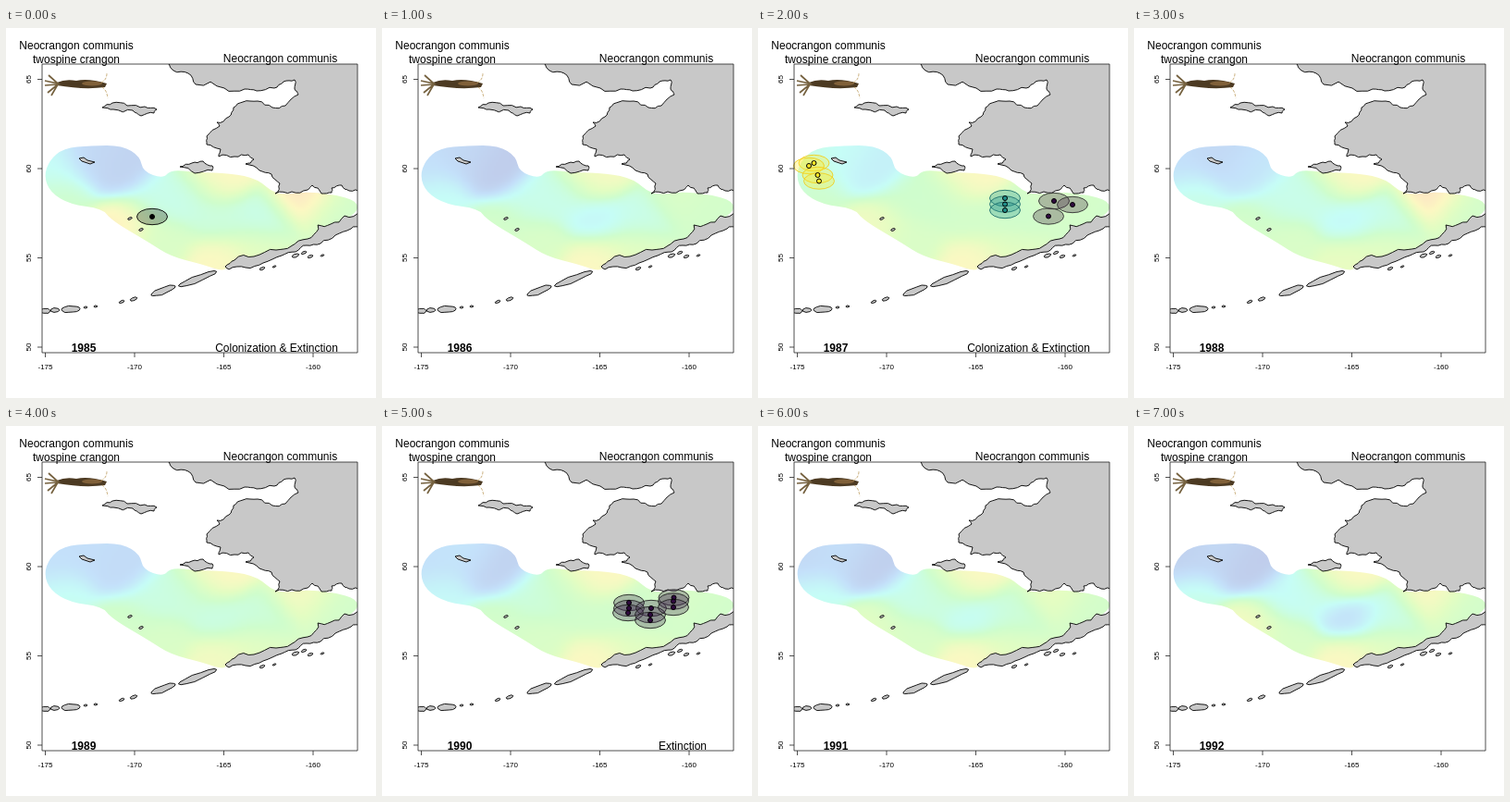
Recreate the animation shown at these times as an HTML page with a canvas. Size 400x400 px, loop 8000 ms.

```html
<!DOCTYPE html>
<html lang="en">
<head>
<meta charset="utf-8">
<title>Colonization and extinction map</title>
<style>
html, body { margin: 0; width: 100%; height: 100%; overflow: hidden; background: #fff; }
canvas, svg { position: absolute; left: 0; top: 0; width: 400px; height: 400px; }
text { font: 12px "Liberation Sans", Arial, sans-serif; text-anchor: middle; }
.tick { font-size: 8px; }
.land { fill: #c8c8c8; stroke: #000; stroke-width: .9; stroke-linejoin: round; }
.axis { fill: none; stroke: #222; stroke-width: .8; }
</style>
</head>
<body>
<canvas id="field" width="400" height="400"></canvas>
<svg viewBox="0 0 400 400">
  <clipPath id="plot"><rect x="39" y="39" width="341" height="312"/></clipPath>
  <g class="land" clip-path="url(#plot)"><path id="land"/></g>
  <g id="shrimp" fill="#4c3a22">
    <path d="M55 59Q64 55 76 57Q89 54 109 60L107 64Q84 67 55 62Z"/>
    <ellipse cx="93" cy="60" rx="11" ry="2.5" fill="#806039"/>
    <path d="M46 51L56 60 42 57M42 62L56 61 45 70M56 61L49 73" fill="none" stroke="#75613f" stroke-width="1.7"/>
    <path d="M103 59Q109 56 109 49M104 64Q109 67 110 76" fill="none" stroke="#c3a56c" stroke-width=".9" stroke-dasharray="3 1.5"/>
  </g>
  <g id="events"></g>
  <g id="axes"></g>
  <text x="76" y="23">Neocrangon communis</text>
  <text x="76" y="38">twospine crangon</text>
  <text x="296.5" y="37" font-style="italic">Neocrangon communis</text>
  <text id="year" x="84" y="350" style="font-weight:bold"></text>
  <text id="label" y="350"></text>
</svg>
<script>
const $ = id => document.getElementById(id);
const STEP = 1000, FIRST = 1985, COUNT = 8;

let seed = 11;
const rand = () => (seed = seed * 16807 % 2147483647) / 2147483647;
const pairs = s => s.split(",").map(p => p.trim().split(" ").map(Number));

// Midpoint displacement gives a coarse outline its ragged shore.
function roughen(pts, depth = 2) {
  if (!depth) return pts;
  const out = pts.flatMap(([x, y], i) => {
    const [u, v] = pts[(i + 1) % pts.length];
    const k = Math.hypot(u - x, v - y) > 40 ? 0 : (rand() - .5) * .34;
    return [[x, y], [(x + u) / 2 + (y - v) * k, (y + v) / 2 + (u - x) * k]];
  });
  return roughen(out, depth - 1);
}
const outline = pts => "M" + pts.map(p => p.map(n => n.toFixed(1)).join(" ")).join("L") + "Z";

const seward = "168 36, 181 46, 197 49, 205 61, 236 65, 258 66, 271 68, 290 65, 300 58, 312 56, 312 66, 316 72";
const delta = "302 84, 288 86, 272 79, 256 80, 246 86, 241 96, 228 102, 231 106, 217 117, 217 126, 232 131, 230 139";
const bay = "247 139, 262 137, 268 142, 259 147, 274 154, 287 158, 296 168, 291 179, 309 177, 326 175, 331 170, 341 179, 352 178";
const corner = "352 173, 363 170, 371 176, 384 178, 384 36";
const north = "384 198, 366 203, 351 212, 337 213, 338 217, 326 228, 308 236, 292 240, 268 247, 247 251, 237 258, 241 261";
const south = "259 259, 278 254, 298 246, 313 242, 325 235, 340 233, 356 224, 373 217, 384 214";
const lawrence = "104 86, 115 81, 131 84, 150 85, 163 88, 160 92, 146 95, 137 89, 116 88";
const nunivak = "188 150, 201 146, 213 144, 223 149, 223 154, 204 157";
const matthew = "79 141, 84 140, 88 143, 96 145, 91 147, 82 144";

// Small islands: centre and half length.
const islets = pairs(`134 206 2.5, 146 218 2.5, 207 271 22, 170 284 14, 138 293 4, 125 296 3, 97 301 2,
  86 302 2, 70 304 10, 53 305 5, 42 306 6, 277 260 3, 290 258 2, 313 246 4, 322 243 3, 329 247 3, 342 246 2`);

function islet([x, y, r]) {
  const n = r > 9 ? 14 : 7, tilt = x < 100 ? -.05 : -.36;
  const pts = Array.from({ length: n }, (_, i) => {
    const a = i / n * 2 * Math.PI, k = .8 + .4 * rand();
    const u = r * Math.cos(a), v = Math.min(3.5, r * .45) * Math.sin(a) * k;
    return [x + u * Math.cos(tilt) - v * Math.sin(tilt), y + u * Math.sin(tilt) + v * Math.cos(tilt)];
  });
  return outline(pts);
}

// Survey regions: position and usual temperature class.
const regions = {
  west: [52, 152, 1], southwest: [62, 180, 2.4], matthew: [92, 144, .7], shelf: [121, 157, .5],
  pribilof: [127, 211, 3.2], middle: [163, 188, 2.3], slope: [167, 230, 3.5], channel: [196, 181, 2.3],
  nunivak: [228, 162, 5], basin: [232, 207, 2], pass: [232, 252, 5], inner: [277, 205, 2.3],
  unimak: [272, 240, 3.9], bristol: [322, 182, 3.5], head: [355, 198, 3.2]
};
const changes = {
  1985: { west: 2, southwest: 3, pribilof: 5.3, basin: 2.6, bristol: 5.9 },
  1986: { southwest: 2.1, shelf: .2, nunivak: 4.7, basin: 1.7 },
  1987: { west: 2.5, southwest: 3, matthew: 2, shelf: 1.5, pribilof: 4.5, middle: 3, channel: 3, basin: 3.2, inner: 3 },
  1988: { shelf: 1.2, basin: 1.8, pass: 4.2, bristol: 6 },
  1990: { southwest: 1.9, matthew: 1.2, shelf: .4, channel: 3, middle: 2.6, basin: 3.1, inner: 3 },
  1992: { west: .4, shelf: .2, pribilof: 4.6, middle: 1.9, basin: .9, bristol: 5 }
};
const ramp = ["#bec6e6", "#c4e0fa", "#c6fdf7", "#cffdcd", "#e4fdc2", "#fcf8c2", "#fde2c4"]
  .map(c => [1, 3, 5].map(i => parseInt(c.slice(i, i + 2), 16)));

const both = { text: "Colonization & Extinction", x: 292.5 };
const events = {
  1985: { label: both, groups: [{ fill: "#222", line: "#000", dot: "#000", at: "158 204" }] },
  1987: { label: both, groups: [
    { fill: "#fde725", line: "#f0cf20", dot: "#fde725", at: "60.5 146, 55 149, 64.5 159, 66 165.5" },
    { fill: "#21908c", line: "#1d706d", dot: "#21908c", at: "267 184, 267 190.5, 267 197" },
    { fill: "#442244", line: "#333", dot: "#300a40", at: "320 187, 340 191, 314 203.5" }
  ] },
  1990: { label: { text: "Extinction", x: 325 }, groups: [
    { fill: "#442850", line: "#222", dot: "#300a40",
      at: "267 191, 267 197, 266 202, 291 197, 290 204, 290 210, 315.5 185.5, 315 189.5, 315 196" }
  ] }
};

const border = pairs(`41 160, 47 143, 62 130, 92 127, 126 127, 145 139, 148 155, 170 163, 178 153, 206 156,
  243 157, 272 163, 292 181, 325 177, 354 180, 380 187, 380 201, 334 224, 300 241, 240 258, 234 263,
  214 256, 178 247, 155 232, 114 208, 104 195, 70 191, 48 178`);

function smoothPath(pts) {
  const path = new Path2D();
  const mid = i => {
    const a = pts[i % pts.length], b = pts[(i + 1) % pts.length];
    return [(a[0] + b[0]) / 2, (a[1] + b[1]) / 2];
  };
  path.moveTo(...mid(0));
  for (let i = 1; i <= pts.length; i++) path.quadraticCurveTo(...pts[i % pts.length], ...mid(i));
  return path;
}
const area = smoothPath(border);

const levelsFor = year => Object.entries(regions).map(([name, r]) => changes[year][name] ?? r[2]);
function levels(year) {
  if (changes[year]) return levelsFor(year);
  const next = levelsFor(year + 1);
  return levelsFor(year - 1).map((v, i) => (v + next[i]) / 2);
}

function levelAt(x, y, values) {
  let sum = 0, total = 0;
  Object.values(regions).forEach(([rx, ry], i) => {
    const w = Math.exp(-((x - rx) ** 2 / 760 + (y - ry) ** 2 / 480)) + 1e-9;
    sum += w * values[i];
    total += w;
  });
  return sum / total;
}

function renderField(values) {
  const x0 = 40, y0 = 126, w = 170, h = 70;
  const small = document.createElement("canvas");
  small.width = w;
  small.height = h;
  const ctx = small.getContext("2d"), img = ctx.createImageData(w, h);
  for (let p = 0; p < w * h; p++) {
    const v = levelAt(x0 + 2 * (p % w) + 1, y0 + 2 * Math.floor(p / w) + 1, values);
    const k = Math.min(ramp.length - 2, Math.floor(v));
    for (let c = 0; c < 3; c++)
      img.data[4 * p + c] = ramp[k][c] + (ramp[k + 1][c] - ramp[k][c]) * (v - k);
    img.data[4 * p + 3] = 255;
  }
  ctx.putImageData(img, 0, 0);
  const full = document.createElement("canvas");
  full.width = full.height = 400;
  const out = full.getContext("2d");
  out.clip(area);
  out.drawImage(small, x0, y0, 2 * w, 2 * h);
  return full;
}

const eventMarkup = ({ groups }) => groups.map(g => {
  const at = pairs(g.at);
  return at.map(([x, y]) => `<ellipse cx="${x}" cy="${y}" rx="16.5" ry="8.7" fill="${g.fill}"
    fill-opacity=".3" stroke="${g.line}" stroke-width=".9"/>`).join("") +
    at.map(([x, y]) => `<circle cx="${x}" cy="${y}" r="2.5" fill="${g.dot}" stroke="#000"/>`).join("");
}).join("");

function axisMarkup() {
  let lines = "M39 39H380V351H39Z", labels = "";
  for (let i = 0; i < 4; i++) {
    const x = 42.5 + 96.5 * i, y = 345 - 96.5 * i;
    lines += `M${x} 351v5M39 ${y}h-5`;
    labels += `<text class="tick" x="${x}" y="369">${-175 + 5 * i}</text>
      <text class="tick" transform="translate(27 ${y}) rotate(-90)">${50 + 5 * i}</text>`;
  }
  return `<path class="axis" d="${lines}"/>${labels}`;
}

const coasts = [[seward, delta, bay, corner].join(), [north, south].join(), lawrence, nunivak];
$("land").setAttribute("d", coasts.map(c => outline(roughen(pairs(c)))).join("") +
  outline(pairs(matthew)) + islets.map(islet).join(""));
$("axes").innerHTML = axisMarkup();

const ctx = $("field").getContext("2d");
const years = Array.from({ length: COUNT }, (_, i) => FIRST + i);
const fields = years.map(y => renderField(levels(y)));
let shown = -1;

function show(i) {
  const year = years[i], event = events[year];
  ctx.clearRect(0, 0, 400, 400);
  ctx.drawImage(fields[i], 0, 0);
  $("year").textContent = year;
  $("events").innerHTML = event ? eventMarkup(event) : "";
  $("label").textContent = event ? event.label.text : "";
  if (event) $("label").setAttribute("x", event.label.x);
}

const start = performance.now();
function tick() {
  const i = Math.floor((performance.now() - start) / STEP) % COUNT;
  if (i !== shown) show(shown = i);
  requestAnimationFrame(tick);
}
tick();
</script>
</body>
</html>
```
